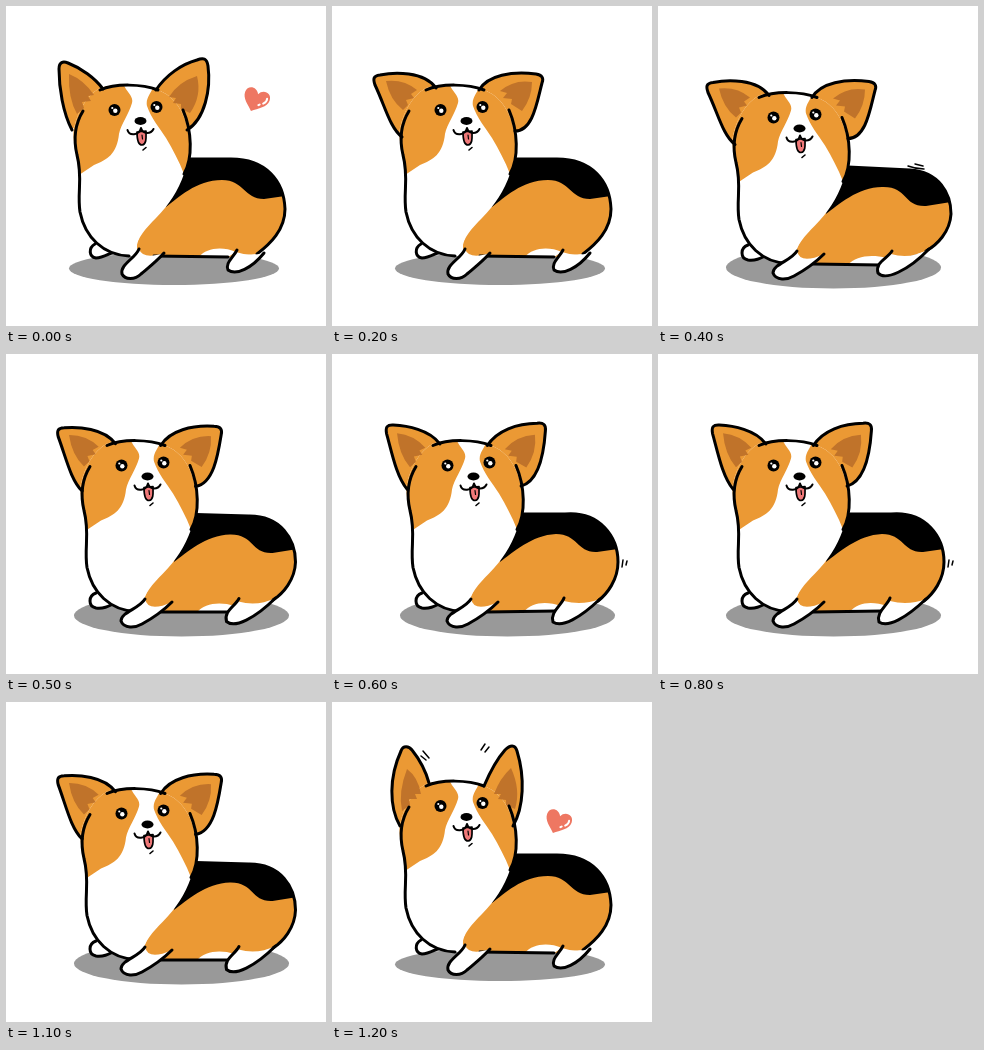
An HTML page with a canvas that plays this animation: 320x320 px, repeating every 1300 ms.

```html
<!DOCTYPE html>
<html lang="en">
<head>
<meta charset="utf-8">
<title>Happy corgi</title>
<style>
html, body { margin: 0; height: 100%; overflow: hidden; background: #fff; }
canvas { display: block; }
</style>
</head>
<body>
<canvas width="320" height="320"></canvas>
<script>
const ctx = document.querySelector('canvas').getContext('2d');
const ORANGE = '#eb9934', BROWN = '#c0732a', CORAL = '#ee7762';
const STEP = 100;

// One pose per step: [crouch, ear droop, rump sway]; the ears follow the wagging rump
const wag = [.5, 1, .5, 0, -.5, 0, .5, 1, .5].map(sway => [1, .55 + .45 * sway, sway]);
const poses = [[0, 0, 0], [0, .5, 0], [0, 1, 0], ...wag, [0, -1, 0]];
const hearts = { 12: [226, 120], 0: [250, 94], 1: [270, 58] };
const ticks = {
  4: 'M250 160Q258 163 266 163M257 158L265 160',
  6: 'M291 206L290 213M295 207L294 211',
  12: 'M91 49L97 56M89 54L94 58M149 48L153 42M153 50L157 45'
};
ticks[8] = ticks[6];
ticks[10] = ticks[4];

// Each ear: tall, relaxed, drooping
const ears = [
  ['M68 124C57 105 57 75 69 49C71 43 77 44 80 48C88 58 94 70 97 81',
   'M66 124C57 107 53 82 53 63C53 56 57 55 62 57C75 62 89 72 97 83',
   'M70 131C58 122 53 100 43 79C41 73 41 70 48 69C62 66 92 65 104 82'],
  ['M152 84C158 70 165 57 173 48C178 43 183 42 185 49C193 75 192 105 181 124',
   'M150 84C160 69 176 58 191 54C198 51 201 53 202 60C205 83 199 113 181 124',
   'M147 84C156 69 180 65 204 68C210 69 212 72 210 77C205 96 201 125 183 125']
];
const inners = [
  ['M75 67Q86 75 89 92L83 92L85 97L77 97L78 103L70 109Q66 90 75 67',
   'M63 68Q78 74 88 89L82 90L85 95L76 96L78 102L71 108Q62 92 63 68',
   'M54 75Q72 73 85 84L79 88L82 92L74 94L76 99L71 104Q58 94 54 75'],
  ['M179 66Q168 76 162 92L169 92L166 97L174 98L174 103L183 107Q189 88 179 66',
   'M191 70Q172 76 163 91L170 92L167 97L175 98L175 103L184 107Q196 90 191 70',
   'M200 76Q182 73 168 85L175 87L171 92L180 93L179 98L190 105Q200 92 200 76']
];

// Rump parts: standing, crouched, crouched and swayed
const rump = [
  'M170 153L225 153C260 153 278 175 279 203C279 224 264 238 251 248L222 251L125 250L145 205Z',
  'M178 160L233 160C268 157 286 183 286 208C286 226 275 240 266 247L225 258L132 258L152 213Z',
  'M178 161L252 164C281 166 293 187 293 208C292 226 279 239 268 245L225 259L132 258L152 213Z'
];
const saddle = [
  'M160 201C172 192 190 174 216 174C238 174 238 193 258 193L285 189L285 145L170 145Z',
  'M168 208C180 199 200 181 224 180C246 180 245 199 265 198L292 194L292 150L178 150Z',
  'M168 208C180 199 200 181 224 181C250 180 245 201 268 200L299 195L299 150L178 150Z'
];
const backLine = [
  'M184 153L225 153C260 153 278 175 279 203C279 224 264 238 251 248M148 250L222 251',
  'M190 160L233 160C268 157 286 183 286 208C286 226 275 240 266 247M155 258L224 257',
  'M190 161L252 164C281 166 293 187 293 208C292 226 279 239 268 245M155 258L222 259'
];
const belly = [
  'M193 251C200 242 216 240 230 246L222 251Z',
  'M192 258C199 248 215 247 229 252L222 258Z',
  'M190 259C197 250 214 248 228 252L220 259Z'
];

// Feet are open outlines; a cuff closes the white part below the fur
const hindFoot = [
  'M231 244C227 252 219 257 222 264C230 270 246 262 258 247',
  'M232 244C229 252 218 258 221 268C230 274 248 264 268 245',
  'M234 245C229 253 217 256 220 267C227 275 250 265 271 243'
];
const hindCuff = ['Q244 251 230 246', 'Q250 252 232 247', 'Q252 254 233 248'];
const frontFoot = [
  'M133 243C129 253 114 258 116 268C119 274 129 274 135 268C142 262 150 256 158 247',
  'M139 245C133 255 115 258 115 267C118 275 129 274 136 270C147 264 156 258 166 248'
];
const frontCuff = ['Q137 254 133 243', 'Q142 259 139 245'];
const leftFoot = [
  'M89 238C82 242 83 251 90 252C97 252 102 248 108 246',
  'M90 239C82 242 82 252 90 254C98 255 103 252 109 249'
];

const torso = 'M94 82C110 77 136 78 152 84C168 90 180 105 184 135C185 150 183 160 178 168' +
  'C172 185 163 199 150 212C140 222 130 233 131 242L135 250L120 250C98 248 80 232 75 210' +
  'C72 192 76 178 74 165C70 150 66 130 68 122C72 105 80 90 94 82Z';
const torsoLine = 'M94 84C110 77 136 78 152 84M77 105C69 118 67 132 71 149' +
  'C77 172 71 186 74 206C79 231 97 249 123 250M177 104C186 125 187 152 178 168';
const mask = 'M116 74C119 86 128 89 126 97C123 108 115 118 113 128C111 148 101 154 88 159L70 171L60 76Z' +
  'M150 74C147 86 139 91 141 100C145 112 153 121 160 132C167 144 173 155 178 168L195 165L190 76Z';

function mix(a, b, t) {
  const to = b.match(/[\d.]+/g);
  let i = 0;
  return a.replace(/[\d.]+/g, n => (+n + (to[i++] - n) * t).toFixed(2) + ' ');
}

function fill(path, color) {
  ctx.fillStyle = color;
  ctx.fill(new Path2D(path));
}

function line(path, width = 3) {
  ctx.strokeStyle = '#000';
  ctx.lineWidth = width;
  ctx.stroke(new Path2D(path));
}

function oval(x, y, rx, ry, color) {
  ctx.fillStyle = color;
  ctx.beginPath();
  ctx.ellipse(x, y, rx, ry, 0, 0, 7);
  ctx.fill();
}

function clipped(path, paint) {
  ctx.save();
  ctx.clip(new Path2D(path));
  paint();
  ctx.restore();
}

function drawFoot(outline, cuff = '') {
  fill(outline + cuff, '#fff');
  line(outline);
}

function drawFace() {
  for (const [x, y] of [[108.5, 104], [150.5, 101]]) {
    oval(x, y, 6, 6, '#000');
    oval(x + .8, y + .8, 2.2, 2.2, '#fff');
    oval(x - 2.2, y - 2, 1.1, 1.1, '#fff');
  }
  const tongue = 'M131 126C131 133 132 139 136 139C141 138 140 131 140 125Z';
  fill(tongue, '#ef7878');
  line(tongue, 1.7);
  line('M136 129L136.5 133', 1.2);
  line('M121.5 124C123 130 133 130 135 122C137 129 145 128 147.5 123', 2);
  line('M137 144L140 141.5', 1.6);
  oval(134.5, 115, 6, 3.9, '#000');
}

function drawHeart([x, y]) {
  ctx.save();
  ctx.translate(x, y);
  ctx.rotate(.35);
  fill('M-1 12C-6 7 -13 3 -13 -4C-13 -12 -3 -13 0 -6C3 -13 13 -12 13 -4C13 3 5 7 -1 12Z', CORAL);
  ctx.strokeStyle = '#fff';
  ctx.lineWidth = 2;
  ctx.stroke(new Path2D('M10 -5Q11 -2 8 1M5 3L4 4'));
  ctx.restore();
}

function draw(step) {
  const [crouch, droop, sway] = poses[step];
  const ear = ([tall, rest, low]) => droop < 0 ? mix(rest, tall, -droop) : mix(rest, low, droop);
  const hind = ([up, down, out]) => mix(mix(up, down, crouch), mix(up, out, crouch), sway);
  const front = ([up, down]) => mix(up, down, crouch);

  ctx.clearRect(0, 0, 320, 320);
  ctx.lineCap = ctx.lineJoin = 'round';
  oval(168 + 7.5 * crouch, 262.5 - crouch, 105 + 2.5 * crouch, 16.5 + 4.5 * crouch, '#999');

  const body = hind(rump);
  fill(body, ORANGE);
  clipped(body, () => {
    fill(hind(saddle), '#000');
    fill(hind(belly), '#fff');
  });
  line(hind(backLine));
  drawFoot(hind(hindFoot), hind(hindCuff));
  drawFoot(front(leftFoot));

  ctx.save();
  ctx.translate(7 * crouch, 7.5 * crouch);
  ears.forEach(e => fill(ear(e), ORANGE));
  fill(torso, '#fff');
  clipped(torso, () => fill(mask, ORANGE));
  inners.forEach(e => fill(ear(e), BROWN));
  ears.forEach(e => line(ear(e)));
  line(torsoLine);
  drawFace();
  ctx.restore();

  drawFoot(front(frontFoot), front(frontCuff));
  if (ticks[step]) line(ticks[step], 1.5);
  if (hearts[step]) drawHeart(hearts[step]);
}

const start = performance.now();
function tick() {
  draw(Math.floor((performance.now() - start) / STEP) % poses.length);
  requestAnimationFrame(tick);
}
tick();
</script>
</body>
</html>
```
